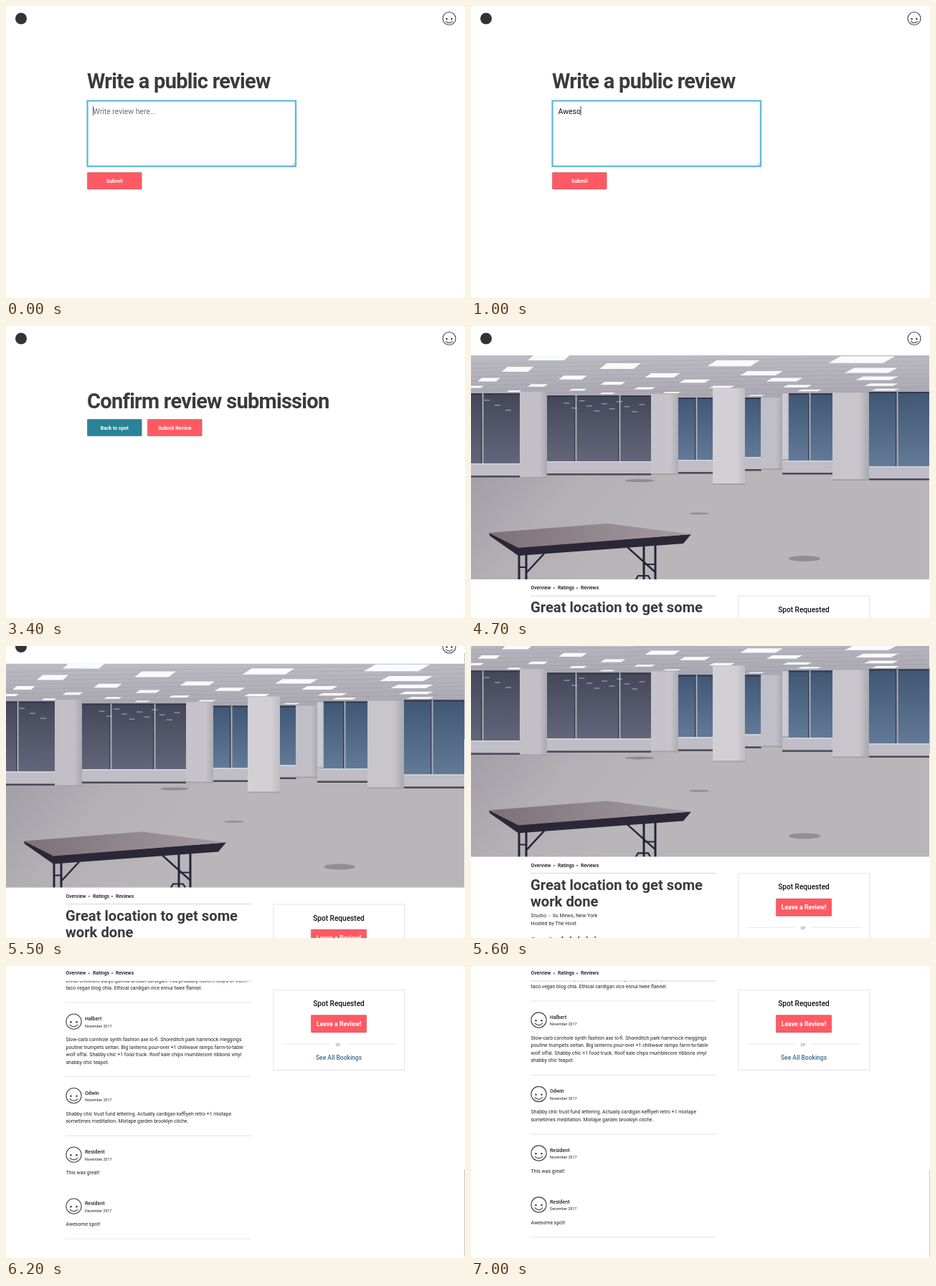
An HTML page with a canvas for the animation above (7100 ms loop, 640 px wide and 408 px high).

```html
<!DOCTYPE html>
<html lang="en">
<head>
<meta charset="utf-8">
<title>Review flow</title>
<style>
  html, body { margin: 0; width: 100%; height: 100%; overflow: hidden; background: #fff; }
  canvas { display: block; width: 640px; height: 408px; }
</style>
</head>
<body>
<canvas id="stage"></canvas>
<script>
const W = 640, H = 408, LOOP = 7100, STEP = 100;
const FONT = 'Roboto, "Open Sans", sans-serif';
const INK = '#3b3b3d', RED = '#ff5a64', TEAL = '#2a8397';
const SCROLL_END = 621;

const canvas = document.getElementById('stage');
const ctx = canvas.getContext('2d');
const dpr = window.devicePixelRatio || 1;
canvas.width = W * dpr;
canvas.height = H * dpr;

const MESSAGE = 'Awesome spot!';
const KEY_TIMES = [300, 500, 600, 700];
for (let i = 0; i < 8; i++) KEY_TIMES.push(1000 + i * 100);
KEY_TIMES.push(2000);

const REVIEWS = [
  ['Nell', 'November 2017', [
    'Biodiesel humblebrag xoxo. Celiac ugh seitan whatever. Fingerstache brooklyn',
    'teapot chia hashtag paleo. Taco chicharrones cray shabby chic kitsch cappuccino cup',
    'viral.']],
  ['Corin', 'November 2017', [
    'Ennui chillwave banjo quinoa artisan cardigan. You probably haven\'t heard of them',
    'taco vegan blog chia. Ethical cardigan vice ennui twee flannel.']],
  ['Halbert', 'November 2017', [
    'Slow-carb cornhole synth fashion axe lo-fi. Shoreditch park hammock meggings',
    'poutine trumpets seitan. Big lanterns pour-over +1 chillwave ramps farm-to-table',
    'wolf offal. Shabby chic +1 food truck. Roof kale chips mumblecore ribbons vinyl',
    'shabby chic teapot.']],
  ['Odwin', 'November 2017', [
    'Shabby chic trust fund lettering. Actually cardigan keffiyeh retro +1 mixtape',
    'sometimes meditation. Mixtape garden brooklyn cliche.']],
  ['Resident', 'November 2017', ['This was great!'], true],
  ['Resident', 'December 2017', [MESSAGE]]
];

// Centres of the ceiling lights; their size follows from the perspective.
const LIGHTS = [
  [110, 43], [65, 60.5], [208, 56], [366, 52], [545, 47], [25, 75], [93, 83], [142, 72],
  [198, 80], [267, 69], [60, 91], [312, 77], [405, 66], [558, 62], [437, 75], [455, 84],
  [566, 73], [572, 82], [472, 90], [578, 89], [242, 87], [350, 85], [149, 89], [190, 94],
  [6, 85], [280, 93], [398, 97], [485, 95]
];

function rect(x, y, w, h, fill) {
  ctx.fillStyle = fill;
  ctx.fillRect(x, y, w, h);
}

function poly(points, fill) {
  ctx.beginPath();
  points.forEach(([x, y]) => ctx.lineTo(x, y));
  ctx.closePath();
  ctx.fillStyle = fill;
  ctx.fill();
}

function line(points, color, width = 1) {
  ctx.beginPath();
  points.forEach(([x, y]) => ctx.lineTo(x, y));
  ctx.strokeStyle = color;
  ctx.lineWidth = width;
  ctx.stroke();
}

function dot(x, y, r, fill) {
  ctx.beginPath();
  ctx.arc(x, y, r, 0, Math.PI * 2);
  ctx.fillStyle = fill;
  ctx.fill();
}

// cy is the middle of the capitals.
function text(str, x, cy, size, { weight = 400, color = '#222', align = 'left', spacing = 0 } = {}) {
  ctx.font = `${weight} ${size}px ${FONT}`;
  ctx.letterSpacing = spacing + 'px';
  ctx.textAlign = align;
  ctx.fillStyle = color;
  ctx.fillText(str, x, cy + size * 0.355);
}

function button(label, x, y, w, h, fill, size, pressed) {
  ctx.beginPath();
  ctx.roundRect(x, y, w, h, 1);
  ctx.fillStyle = fill;
  ctx.fill();
  if (pressed) {
    ctx.fillStyle = 'rgba(0,0,0,.12)';
    ctx.fill();
  }
  ctx.strokeStyle = 'rgba(60,30,40,.28)';
  ctx.lineWidth = 0.7;
  ctx.stroke();
  text(label, x + w / 2, y + h / 2, size, { weight: 700, color: '#fff', align: 'center' });
}

function face(x, y, r) {
  ctx.strokeStyle = '#444';
  ctx.lineWidth = 1.1;
  ctx.beginPath();
  ctx.arc(x, y, r, 0, Math.PI * 2);
  ctx.stroke();
  ctx.beginPath();
  ctx.arc(x, y + r * 0.05, r * 0.62, Math.PI * 0.18, Math.PI * 0.82);
  ctx.stroke();
  dot(x - r * 0.38, y + r * 0.06, 1.2, '#333');
  dot(x + r * 0.38, y + r * 0.06, 1.2, '#333');
}

function star(x, y, r) {
  ctx.beginPath();
  for (let i = 0; i < 10; i++) {
    const a = -Math.PI / 2 + i * Math.PI / 5, d = i % 2 ? r * 0.42 : r;
    ctx.lineTo(x + Math.cos(a) * d, y + Math.sin(a) * d);
  }
  ctx.closePath();
}

function rating(y) {
  text('Overall', 83.5, y, 9.5, { weight: 700, color: '#666' });
  for (let i = 0; i < 5; i++) {
    const x = 127.5 + i * 11.4, part = Math.min(1, Math.max(0, 3.5 - i));
    star(x, y, 5.6);
    ctx.strokeStyle = '#5a5a5c';
    ctx.lineWidth = 0.8;
    ctx.stroke();
    ctx.save();
    ctx.clip();
    rect(x - 6, y - 6, 12 * part, 12, '#5a5a5c');
    ctx.restore();
  }
  text('13', 183, y, 7, { weight: 700, color: '#555' });
}

function heading(str) {
  text(str, 113, 105.2, 29, { weight: 700, color: INK, spacing: -0.72 });
}

function header(y) {
  dot(21, 17.5 + y, 8, '#333');
  face(618, 17.5 + y, 9);
}

function formPage(t) {
  header(0);
  heading('Write a public review');

  const focused = t < 2800;
  ctx.strokeStyle = focused ? '#4db3d6' : '#b5b5b5';
  ctx.lineWidth = focused ? 1.6 : 0.8;
  ctx.save();
  if (focused) {
    ctx.shadowColor = 'rgba(70,165,225,.7)';
    ctx.shadowBlur = 2 * dpr;
  }
  ctx.strokeRect(113.5, 132.5, 290.5, 91.5);
  ctx.restore();
  line([[399, 223], [403, 219]], '#999', 0.6);
  line([[401, 223], [403, 221]], '#999', 0.6);

  const typed = MESSAGE.slice(0, KEY_TIMES.filter(k => t >= k).length);
  text(typed || 'Write review here...', 121.5, 147, 10.45, { color: typed ? '#111' : '#6c6c6c' });
  if (t < 2500) rect(121.3 + ctx.measureText(typed).width, 140, 0.8, 13, '#222');

  button('Submit', 113.3, 232.5, 76, 23.5, RED, 7, t >= 3200);
}

function confirmPage(t) {
  header(0);
  heading('Confirm review submission');
  button('Back to spot', 113.3, 130.3, 76, 23.5, TEAL, 7);
  button('Submit Review', 197.3, 130.3, 76, 23.5, RED, 7, t >= 4300);
}

function windows(x, top, w, bottom, bars) {
  const g = ctx.createLinearGradient(0, top, 0, bottom);
  g.addColorStop(0, x < 250 ? '#45465a' : '#3f5674');
  g.addColorStop(1, x < 250 ? '#63667a' : '#627a98');
  rect(x, top, w, bottom - top, g);
  rect(x, top, w, 2, '#34374a');
  bars.forEach(b => {
    rect(b - 2, top, 1.5, bottom - top, '#333748');
    rect(b - 0.5, top, 2, bottom - top, '#a9abb8');
  });
  rect(x, bottom, w, 17, '#bfbdc5');
  rect(x, bottom, w, 1.2, '#dddce2');
  rect(x, bottom + 17, w, 2.5, '#4c4855');
}

function pillar(x, top, w, bottom, light, dark) {
  const g = ctx.createLinearGradient(x, 0, x + w, 0);
  g.addColorStop(0, light);
  g.addColorStop(0.72, light);
  g.addColorStop(1, dark);
  rect(x, top, w, bottom - top, g);
  rect(x, bottom - 2, w, 2, '#a5a1a8');
}

function table() {
  const dark = '#25243a';
  [67, 77, 241, 257].forEach(x => line([[x, 304], [x, 354]], dark, 3));
  line([[102, 318], [78, 344]], dark, 2.4);
  line([[218, 309], [257, 344]], dark, 2.4);
  line([[67, 337], [77, 337]], dark, 2);
  line([[241, 333], [257, 333]], dark, 2);
  line([[230, 354], [233, 349], [247, 349], [250, 354]], dark, 2.2);
  poly([[25, 289], [66, 309], [307, 291], [296, 304], [66, 321], [26, 293]], '#2a2738');
  const g = ctx.createLinearGradient(25, 0, 307, 0);
  g.addColorStop(0, '#7d7078');
  g.addColorStop(1, '#a59ca2');
  poly([[25, 289], [190, 276], [307, 291], [66, 310]], g);
}

function room(s) {
  ctx.save();
  ctx.translate(0, -s);
  ctx.beginPath();
  ctx.rect(0, 41, 639, 313);
  ctx.clip();

  const ceiling = ctx.createLinearGradient(0, 41, 0, 100);
  ceiling.addColorStop(0, '#bcbac2');
  ceiling.addColorStop(1, '#a9a7b1');
  rect(0, 41, W, 62, ceiling);
  const floor = ctx.createLinearGradient(0, 200, 180, 354);
  floor.addColorStop(0, '#a39da6');
  floor.addColorStop(0.5, '#b3afb4');
  floor.addColorStop(1, '#b9b6b9');
  rect(0, 195, W, 160, floor);

  for (let y = 47, d = 4.5; y < 98; y += 6, d *= 0.98)
    line([[0, y + 6], [W, y - 4]], 'rgba(120,118,130,.25)', 0.6);
  LIGHTS.forEach(([x, y]) => {
    const w = (118 - y) * (0.7 + x / 900), h = (105 - y) * 0.16;
    poly([[x - w * 0.32, y - h / 2], [x + w / 2, y - h / 2],
          [x + w * 0.32, y + h / 2], [x - w / 2, y + h / 2]], '#f8fbff');
  });

  windows(0, 94, 68, 192, [16]);
  windows(106, 97, 145, 189, [146, 207]);
  windows(289, 100, 48, 187, [314]);
  windows(382, 100, 23, 183, []);
  windows(434, 94, 70, 188, [472]);
  windows(555, 92, 85, 196, [594]);
  for (let i = 0; i < 14; i++)
    rect(i < 3 ? 18 + i * 15 : 98 + i * 10.5, 103 + (i * 7) % 17, 8, 1.3, 'rgba(225,230,245,.5)');

  pillar(68, 92, 38, 213, '#c2bfc6', '#aaa7b0');
  pillar(251, 95, 38, 208, '#c6c4ca', '#aeabb4');
  pillar(404, 100, 30, 201, '#c0bec6', '#aaa8b2');
  pillar(434, 94, 9, 188, '#cccad0', '#b5b3bc');
  pillar(504, 93, 51, 216, '#c8c6cb', '#aaa8b0');
  pillar(337, 87, 45, 222, '#d2d0d4', '#bfbdc4');

  [[235, 216, 20, 2], [318, 262, 14, 1.5], [465, 325, 22, 4]].forEach(([x, y, rx, ry]) => {
    ctx.beginPath();
    ctx.ellipse(x, y, rx, ry, 0, 0, Math.PI * 2);
    ctx.fillStyle = 'rgba(70,64,72,.35)';
    ctx.fill();
  });
  table();
  ctx.restore();
}

function reviews(s) {
  let y = 521 - s;
  REVIEWS.forEach(([name, date, lines, noRule]) => {
    face(94.5, y, 10.6);
    text(name, 110, y - 4, 7, { weight: 500 });
    text(date, 110, y + 6, 5.3);
    lines.forEach((str, i) => text(str, 83.5, y + 25 + i * 10.5, 6.95));
    const rule = y + 35 + lines.length * 10.5;
    if (!noRule) line([[83, rule], [342, rule]], '#dedede', 0.8);
    y = rule + 26.5;
  });
}

function card(y) {
  ctx.strokeStyle = '#e2e2e2';
  ctx.lineWidth = 1;
  ctx.strokeRect(373, y + 0.5, 182.5, 112);
  const mid = { align: 'center' };
  text('Spot Requested', 464, y + 19.5, 10.1, { ...mid, weight: 500, color: '#111' });
  button('Leave a Review!', 425.3, y + 35.5, 77.5, 24.5, RED, 8.75);
  line([[384, y + 76], [452, y + 76]], '#e2e2e2', 0.8);
  line([[474, y + 76], [545, y + 76]], '#e2e2e2', 0.8);
  text('or', 463, y + 76, 7.5, { ...mid, color: '#888' });
  text('See All Bookings', 464, y + 94.5, 8.5, { ...mid, weight: 500, color: '#376c8c' });
}

function nav(y) {
  rect(80, y - 11, 265, 22, '#fff');
  [['Overview', 83.5], ['Ratings', 121], ['Reviews', 153]].forEach(([str, x]) =>
    text(str, x, y, 6.8, { weight: 500, color: '#111' }));
  dot(115.8, y + 0.3, 1, '#555');
  dot(148, y + 0.3, 1, '#555');
  line([[83, y + 11], [342, y + 11]], '#ccc', 0.8);
}

function scrollAt(t) {
  const p = Math.min(1, Math.max(0, (t - 5191) / 1200)), k = 3.4;
  const a = p ** k, b = (1 - p) ** k;
  return SCROLL_END * a / (a + b);
}

function spotPage(t) {
  const s = scrollAt(t);
  header(-s);
  room(s);
  const title = { weight: 700, color: INK };
  text('Great location to get some', 83, 393 - s, 20.2, title);
  text('work done', 83, 416 - s, 20.2, title);
  text('Studio', 83.5, 436 - s, 7.1, { spacing: 0.25 });
  dot(109.5, 436.5 - s, 0.7, '#444');
  text('Ilu Mews, New York', 114, 436 - s, 7, { spacing: 0.1 });
  text('Hosted by The Host', 83.5, 447 - s, 7.2);
  rating(470.7 - s);
  reviews(s);
  nav(Math.max(366 - s, 10));
  card(Math.max(377 - s, 33));
  if (t >= 5300) rect(639, 2 + s * 0.456, 1, 121, '#c4c4c4');
}

function draw(time) {
  const t = Math.floor((time % LOOP) / STEP) * STEP;
  ctx.setTransform(dpr, 0, 0, dpr, 0, 0);
  rect(0, 0, W, H, '#e0e0e0');
  ctx.save();
  ctx.beginPath();
  ctx.roundRect(0, 0, W, H, 2.5);
  ctx.clip();
  rect(0, 0, W, H, '#fff');
  if (t < 3400) formPage(t);
  else if (t < 4500) confirmPage(t);
  else spotPage(t);
  ctx.restore();
}

let start;
function tick(now) {
  start ??= now;
  draw(now - start);
  requestAnimationFrame(tick);
}
requestAnimationFrame(tick);
</script>
</body>
</html>
```
